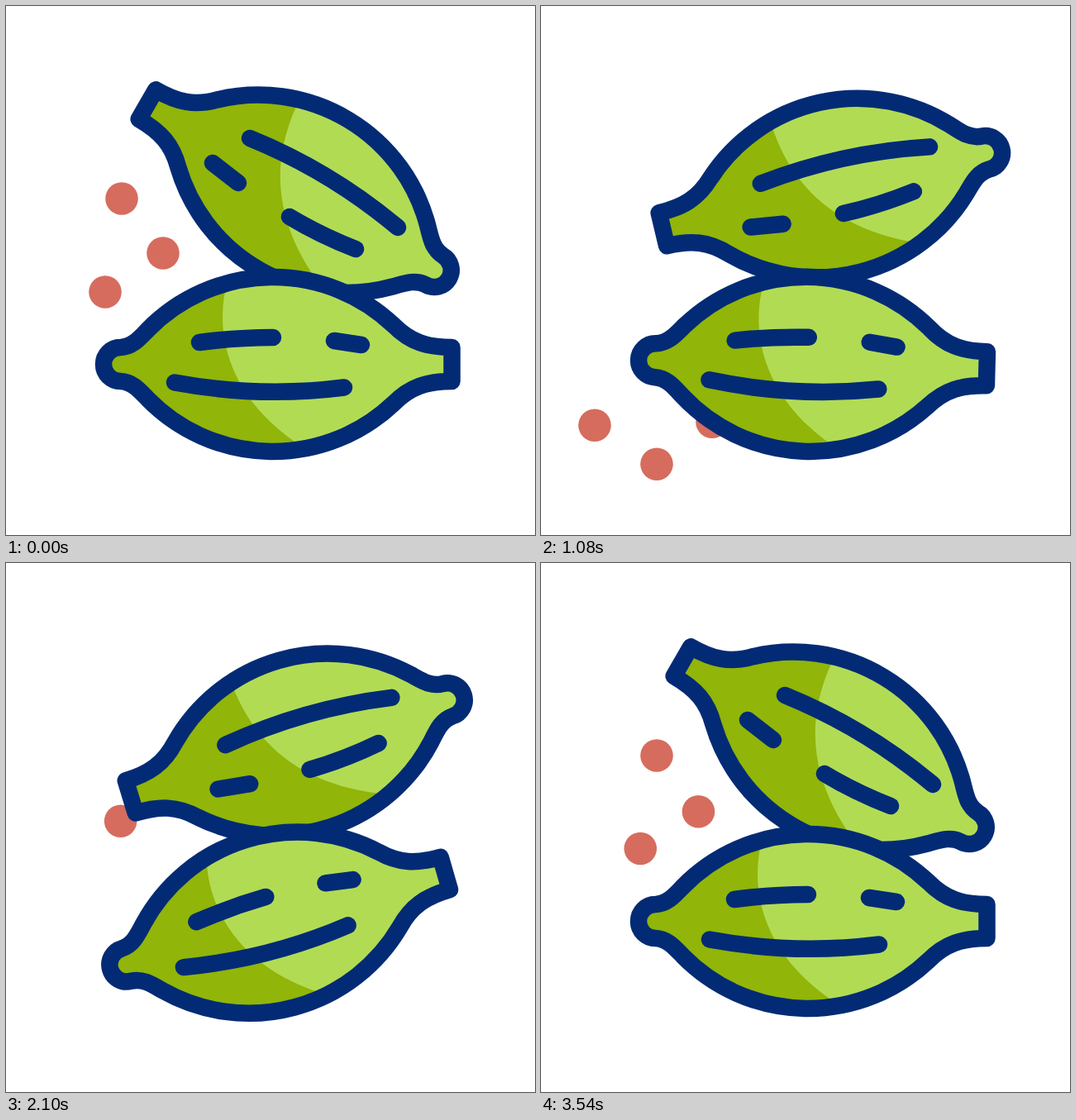
Write an HTML page that moves like this. It is 640 px wide and 640 px high and loops after 3560 ms.

```html
<!DOCTYPE html>
<html lang="en">
<head>
<meta charset="utf-8">
<title>Rocking pods</title>
<style>
  html, body { margin: 0; height: 100%; overflow: hidden; background: #fff; }
  svg { display: block; width: 100vw; height: 100vh; }
  .line { fill: none; stroke: #032b75; stroke-width: 20.5; stroke-linecap: round; stroke-linejoin: round; }
</style>
</head>
<body>
<svg viewBox="0 0 640 640">
  <defs>
    <path id="shape" d="M210.5-20.5C180-20.5 160-27 140-47.2A212 212 0 0 0-157-42.3
      C-167-32-176-21-190.5-20.5A20.5 20.5 0 0 0-190.5 20.5C-176 21-167 32-157 42.3
      A212 212 0 0 0 140 47.2C160 27 180 20.5 210.5 20.5Z"/>
    <clipPath id="inside"><use href="#shape"/></clipPath>
  </defs>
  <g id="dots" fill="#d66c5e"></g>
  <path id="sparks" fill="none" stroke="#ffcc50" stroke-width="20" stroke-linecap="round"/>
  <g id="top">
    <g transform="translate(353.2 224.3) rotate(210)">
      <use href="#shape" fill="#91b508"/>
      <path d="M54 103C51 22 13-43-77-83.5V-120H-230V120H54Z" fill="#b2db54" clip-path="url(#inside)"/>
      <use href="#shape" class="line"/>
      <path class="line" d="M-126.5 22.6Q-22 41 82.5 26.6M-95.3-25.5Q-50-32.5-6.5-31.7M67.7-27.2L106.5-21.9"/>
    </g>
  </g>
  <g id="bottom">
    <g transform="translate(329 433.5)">
      <use href="#shape" fill="#91b508"/>
      <path d="M-60-105C-82-30-52 48 30 100V120H230V-120H-60Z" fill="#b2db54" clip-path="url(#inside)"/>
      <use href="#shape" class="line"/>
      <path class="line" d="M-125 22Q-22 41 80 28M-95-26.5Q-50-32.5-6-32.5M68-28.5L101-23.5"/>
    </g>
  </g>
</svg>
<script>
const LOOP = 3560, FALL_START = 240, FALL_STEP = 420;
const el = id => document.getElementById(id);

// Each seed falls along evenly timed points, then springs from a hidden spot back to the first one
const seeds = [
  { path: [[140, 233], [140, 387], [140, 554], [140, 633], [140, 690]], launch: 2520, from: [85, 200], decay: 110 },
  { path: [[190, 299], [195, 359], [207, 503], [203, 600], [200, 680]], launch: 3438, from: [50, 190], decay: 22 },
  { path: [[120, 346], [104, 394], [65, 507], [79, 584], [106, 660]], launch: 1920, from: [32, -58], decay: 334 }
];
// Inner point, then the way outwards
const rays = [[147, 205, -46, -38], [179, 186, -26, -54], [224, 180, -18, -56]];

// Quadratic ease in and out between two times
function ease(t, from, to) {
  const u = Math.min(1, Math.max(0, (t - from) / (to - from)));
  return u < 0.5 ? 2 * u * u : 1 - 2 * (1 - u) ** 2;
}

const topTilt = t => -47 * ease(t, 240, 742) + 19.4 * (ease(t, 920, 1446) - ease(t, 1460, 1960))
  + 47 * ease(t, 2220, 3385);
const bottomTilt = t => -16 * ease(t, 240, 700) + 21 * (ease(t, 720, 1229) - ease(t, 1400, 2010))
  + 16 * ease(t, 2320, 3395);

// Catmull-Rom curve through the points, one unit of u per point
function along(points, u, axis) {
  const last = points.length - 1;
  const at = i => points[Math.min(last, Math.max(0, i))][axis];
  u = Math.min(last, Math.max(0, u));
  const i = Math.floor(u), f = u - i;
  const [a, b, c, d] = [at(i - 1), at(i), at(i + 1), at(i + 2)];
  return b + f / 2 * (c - a + f * (2 * a - 5 * b + 4 * c - d + f * (3 * (b - c) + d - a)));
}

function seedAt({ path, launch, from, decay }, t, axis) {
  if (t < launch) return along(path, (t - FALL_START) / FALL_STEP, axis);
  return path[0][axis] + from[axis] * Math.exp((launch - t) / decay);
}

const dots = seeds.map(() => {
  const dot = document.createElementNS("http://www.w3.org/2000/svg", "circle");
  dot.setAttribute("r", 19.8);
  return el("dots").appendChild(dot);
});

function draw(t) {
  el("top").setAttribute("transform", `rotate(${topTilt(t)} 349.3 224.2)`);
  el("bottom").setAttribute("transform", `rotate(${bottomTilt(t)} 329 433.5)`);
  seeds.forEach((seed, i) => {
    dots[i].setAttribute("cx", seedAt(seed, t, 0));
    dots[i].setAttribute("cy", seedAt(seed, t, 1));
  });
  const head = ease(t, 1340, 1580), tail = ease(t, 1460, 1700);
  el("sparks").setAttribute("d", head > tail ? rays.map(([x, y, dx, dy]) =>
    `M${x + dx * tail} ${y + dy * tail}L${x + dx * head} ${y + dy * head}`).join("") : "");
}

const start = performance.now();
function frame() {
  draw((performance.now() - start) % LOOP);
  requestAnimationFrame(frame);
}
frame();
</script>
</body>
</html>
```
